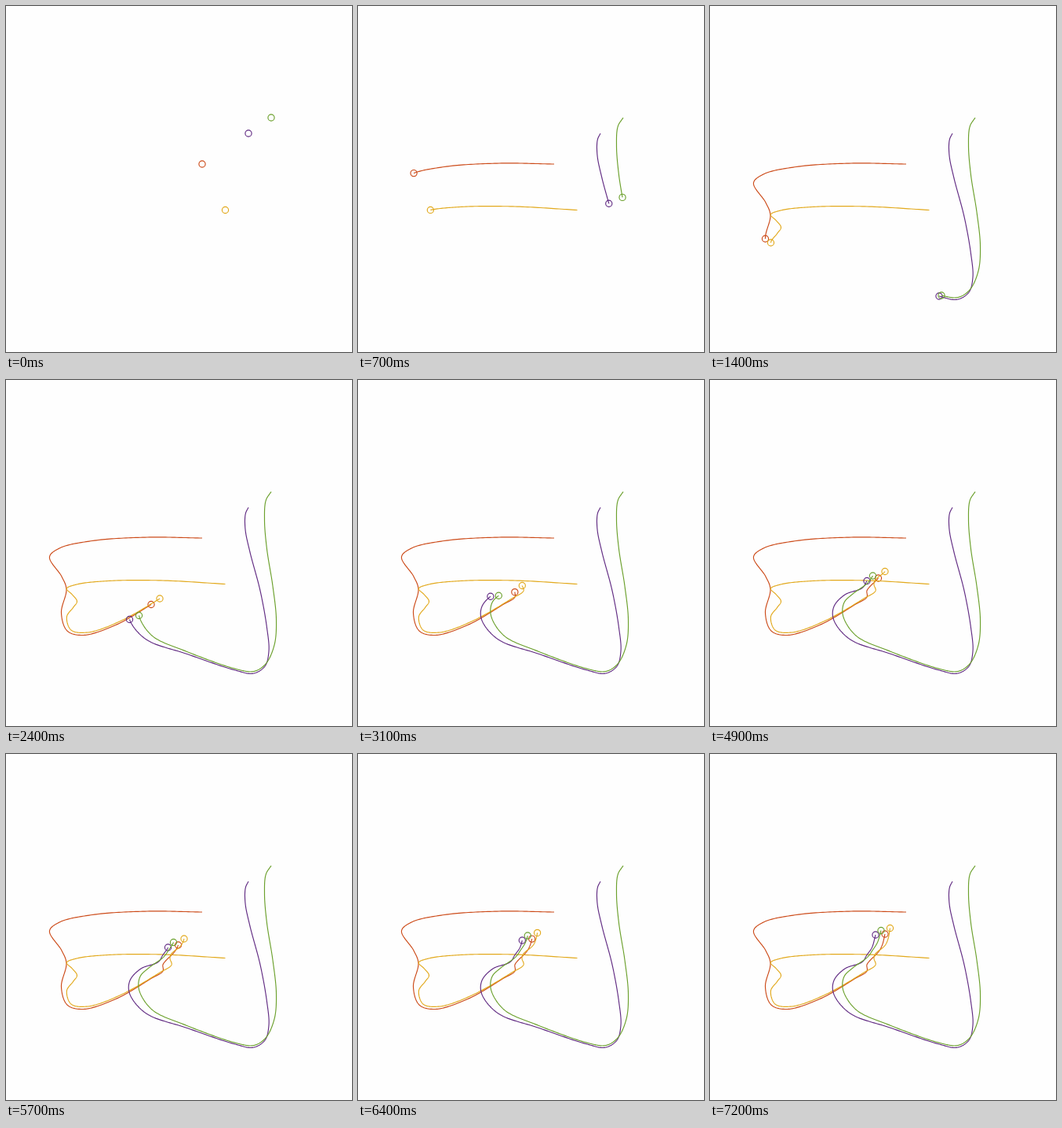
An HTML page that plays this animation: 441 by 440 pixels, repeating every 7.3 s.

```html
<!DOCTYPE html>
<html lang="en">
<head>
<meta charset="utf-8">
<title>Four converging trails</title>
<style>
html, body { margin: 0; width: 100%; height: 100%; overflow: hidden; background: #fefefe; }
svg { display: block; width: 100%; height: 100%; }
</style>
</head>
<body>
<svg id="stage" viewBox="0 0 441 440" fill="none" stroke-width="1.15"></svg>
<script>
const LOOP = 7300, STEP = 100, SAMPLES = 24;

// Each "/" marks the place a trail has reached at the next key time.
const KEYS = [0, 800, 1400, 2400, 3200, 3900, 4900, 5700, 7200];
const TRAILS = [
  ['#cc4a18', '250,201 / 180,200 110,204.5 68,214 55.5,225 / 71,250 77,266 70.5,296 / 78,319 98,324.5 140,311.5 185,285.5 / 200,276 200,268 / 204,262.5 / 214.5,252 / 219.5,243 / 223,229'],
  ['#e2a91c', '279.5,259.5 / 200,255 130,255.5 90,260 77.3,265.3 / 84.5,273 90.5,281.5 85.5,289.5 77.5,301 / 83,318 104,321 145,307 196,278 / 211,268 209,260 / 210.5,254.5 / 223,243.5 / 227,235 / 229.5,221.5'],
  ['#602a82', '309,162 / 305.3,170 305,190 311,219 324,268 / 332.5,315 335,345 330,364 315,373.2 292,369 / 230,348.2 178,329.5 157.5,304.5 / 158,288 172,273 / 194,264.5 / 200,255.5 / 206.5,246 / 211,230'],
  ['#6ba02c', '338,142 / 331.3,153 329.5,178 332.5,215 340,262 / 344.5,305 342,337 331,361 316,370.5 295,368 / 230,345.2 186,325 169.5,299.5 / 171,283 182,272 / 201,258 / 207.5,249 / 213.5,239.5 / 218,224.5']
];

const stage = document.getElementById('stage');
const dist = (a, b) => Math.hypot(b[0] - a[0], b[1] - a[1]);
const mirror = (a, b) => [2 * a[0] - b[0], 2 * a[1] - b[1]];

function hermite(a, b, ma, mb, u) {
  const v = 1 - u;
  return v * v * ((1 + 2 * u) * a + u * ma) + u * u * ((3 - 2 * u) * b - v * mb);
}

// Centripetal Catmull-Rom segment from b to c
function curve(a, b, c, d, u) {
  const [p, q, r] = [dist(a, b), dist(b, c), dist(c, d)].map(Math.sqrt);
  return [0, 1].map(i => {
    const s = (c[i] - b[i]) / q;
    const mb = q * ((b[i] - a[i]) / p - (c[i] - a[i]) / (p + q) + s);
    const mc = q * (s - (d[i] - b[i]) / (q + r) + (d[i] - c[i]) / r);
    return hermite(b[i], c[i], mb, mc, u);
  });
}

// Monotone slopes for travelled length against time
function slopes(ys) {
  const sec = KEYS.slice(1).map((t, i) => (ys[i + 1] - ys[i]) / (t - KEYS[i]));
  const n = sec.length;
  return ys.map((_, i) => {
    if (i === 0) return 0.4 * sec[0];
    if (i === n) return 0.3 * sec[n - 1];
    return 2 * sec[i - 1] * sec[i] / (sec[i - 1] + sec[i]);
  });
}

function add(tag, attrs) {
  const el = document.createElementNS('http://www.w3.org/2000/svg', tag);
  for (const k in attrs) el.setAttribute(k, attrs[k]);
  return stage.appendChild(el);
}

function build([color, text]) {
  const pts = [], ends = [];
  for (const part of text.split('/')) {
    for (const p of part.trim().split(' ')) pts.push(p.split(',').map(Number));
    ends.push(pts.length - 1);
  }
  const n = pts.length;
  const all = [mirror(pts[0], pts[1]), ...pts, mirror(pts[n - 1], pts[n - 2])];
  const dots = [pts[0]], len = [0];
  for (let i = 0; i < n - 1; i++) {
    for (let k = 1; k <= SAMPLES; k++) {
      const p = curve(...all.slice(i, i + 4), k / SAMPLES);
      len.push(len[len.length - 1] + dist(dots[dots.length - 1], p));
      dots.push(p);
    }
  }
  const reach = ends.map(i => len[i * SAMPLES]);
  return {
    dots, len, reach, slope: slopes(reach),
    line: add('polyline', { stroke: color, 'stroke-linejoin': 'round' }),
    ring: add('circle', { stroke: color, r: 4.1 })
  };
}

const trails = TRAILS.map(build);

function travelled({ reach, slope }, t) {
  let i = 0;
  while (i < KEYS.length - 2 && t > KEYS[i + 1]) i++;
  const h = KEYS[i + 1] - KEYS[i];
  return hermite(reach[i], reach[i + 1], slope[i] * h, slope[i + 1] * h, (t - KEYS[i]) / h);
}

function draw(t) {
  for (const trail of trails) {
    const { dots, len, line, ring } = trail;
    const s = travelled(trail, t);
    let k = 1;
    while (k < len.length - 1 && len[k] < s) k++;
    const u = (s - len[k - 1]) / (len[k] - len[k - 1]);
    const tip = [0, 1].map(i => dots[k - 1][i] + u * (dots[k][i] - dots[k - 1][i]));
    const shown = [...dots.slice(0, k), tip];
    line.setAttribute('points', shown.map(p => p.map(v => v.toFixed(2))).join(' '));
    ring.setAttribute('cx', tip[0]);
    ring.setAttribute('cy', tip[1]);
  }
}

const start = performance.now();
function tick() {
  const t = (performance.now() - start) % LOOP;
  draw(Math.floor(t / STEP) * STEP);
  requestAnimationFrame(tick);
}
tick();
</script>
</body>
</html>
```
